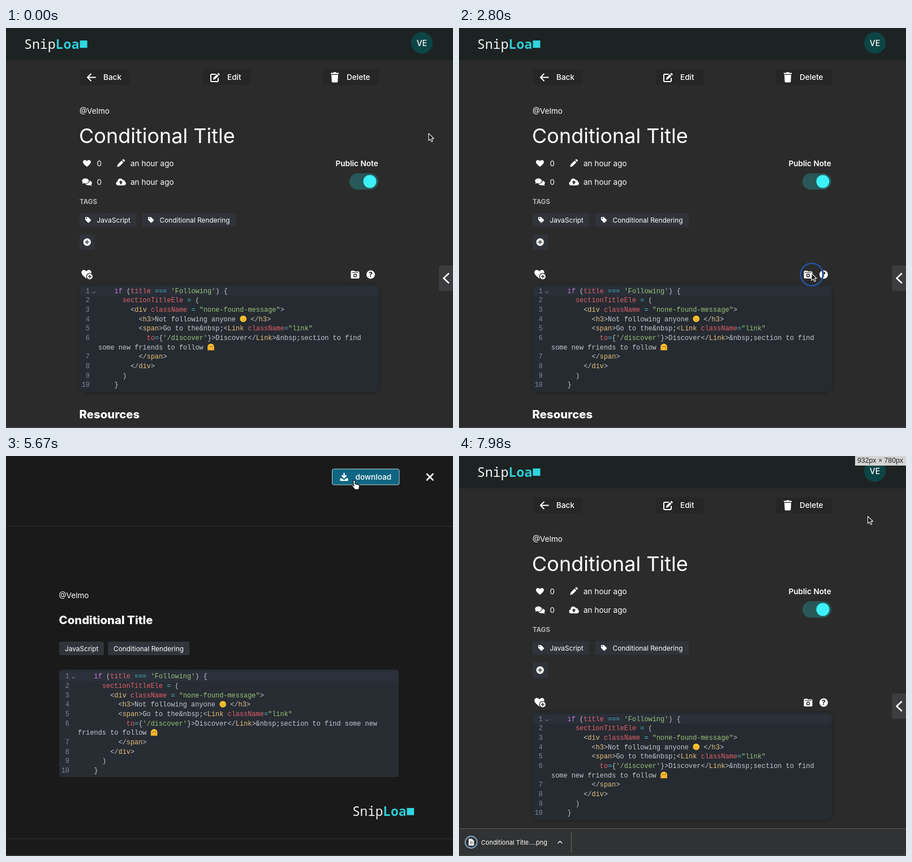
Recreate the animation shown at these times as an HTML page. Size 790 by 709 pixels, loop 8 s.

```html
<!DOCTYPE html>
<html lang="en">
<head>
<meta charset="utf-8">
<title>Code note</title>
<style>
  html, body { margin: 0; width: 100%; height: 100%; overflow: hidden; background: #2b2b2b; }
  svg { display: block; width: 790px; height: 709px; }
  text { white-space: pre; font-family: Inter, sans-serif; font-optical-sizing: none; }
  .code { font-family: "Liberation Mono", monospace; font-size: 11.92px; }
  .logo { font-family: "Noto Sans Mono", monospace; }
  .size { font-family: "Liberation Sans", sans-serif; }
  .line { fill: none; stroke: #fff; stroke-linecap: round; stroke-linejoin: round; }
</style>
</head>
<body>
<svg id="stage" viewBox="0 0 790 709"></svg>
<script>
const LOOP = 8000, CHAR = 7.15, ROW = 16.65;
const BODY = 13.57, SMALL = 11.87, HEADING = 20.35;
const USER = '@Velmo', TITLE = 'Conditional Title';
const COLORS = { w: '#c3c8d0', v: '#c678dd', r: '#e0606b', c: '#45bcc8', s: '#98c379', t: '#e5c07b', n: '#7d8799' };

const escape = s => s.replace(/&/g, '&amp;').replace(/</g, '&lt;');
const text = (x, y, s, size = BODY, weight = 400, fill = '#fff', extra = '') =>
  `<text x="${x}" y="${y}" font-size="${size}" font-weight="${weight}" fill="${fill}" ${extra}>${escape(s)}</text>`;
const rect = (x, y, w, h, fill, rx = 0, extra = '') =>
  `<rect x="${x}" y="${y}" width="${w}" height="${h}" rx="${rx}" fill="${fill}" ${extra}/>`;
const circle = (x, y, r, fill, extra = '') => `<circle cx="${x}" cy="${y}" r="${r}" fill="${fill}" ${extra}/>`;
const path = (d, fill = '#fff', extra = '') => `<path d="${d}" fill="${fill}" ${extra}/>`;
const line = (d, width = 2, extra = '') => `<path class="line" d="${d}" stroke-width="${width}" ${extra}/>`;
const at = (x, y, body, scale = 1) => `<g transform="translate(${x} ${y}) scale(${scale})">${body}</g>`;

// Each row: line number, indent, segments that start with a colour key; "e" is a face.
const rows = wide => [
  ['1', 4, "vif~w (~rtitle~c ===~s 'Following'~w) {"],
  ['2', 6, 'rsectionTitleEle~c =~w ('],
  ['3', 8, 'w<~tdiv~r className~c =~s "none-found-message"~w>'],
  ['4', 10, 'w<~th3~w>Not following anyone ~e~w </~th3~w>'],
  ['5', 10, 'w<~tspan~w>Go to the&nbsp;<~tLink~r className~c=~s"link"'],
  ['6', 12, "rto~c=~w{~s'/discover'~w}>Discover</~tLink~w>&nbsp;section to find" + (wide ? ' some new' : '')],
  ['', 0, (wide ? 'w' : 'wsome new ') + 'friends to follow ~ep'],
  ['7', 10, 'w</~tspan~w>'],
  ['8', 8, 'w</~tdiv~w>'],
  ['9', 6, 'w)'],
  ['10', 4, 'w}'],
];

const face = peeking => circle(6, 0, 5.8, '#fdc52f') + (peeking
  ? path('M3.5-2h2v2h-2zM7-2h2v2h-2z', '#8a5a1a') + path('M.2 0h3.300q1.500 3 1.500 5.800h-4.800zM11.800 0h-3.300q-1.500 3-1.500 5.800h4.800z', '#f5ae2b')
  : line('M2.700-.3q1 .8 2 .2M7.300-.1q1 .6 2-.2M4.800 2.800h2.400', .8, 'style="stroke:#a36a1c"'));

function codeBlock(left, top, wide) {
  return rows(wide).map(([number, indent, source], i) => {
    const y = top + i * ROW;
    let x = left + indent * CHAR;
    const mono = (px, s, color, extra = '') =>
      `<text class="code" x="${px}" y="${y + 3.8}" fill="${color}" ${extra}>${escape(s)}</text>`;
    let out = mono(left - 15, number, COLORS.n, 'text-anchor="end"');
    for (const part of source.split('~')) {
      const key = part[0], s = part.slice(1);
      if (key === 'e') {
        out += at(x, y - .5, face(s));
        x += 11.9;
      } else {
        out += mono(x, s, COLORS[key]);
        x += s.length * CHAR;
      }
    }
    return out;
  }).join('') + line(`M${left - 10} ${top + 1.5}l2.3 2.3 2.3-2.3`, 1, 'style="stroke:#99a0ab"');
}

const logo = (x, y, size) =>
  text(x, y, 'Snip', size, 300, '#f2f2f2', 'class="logo"') +
  text(x + size * 2.4, y, 'Loa', size, 700, '#2fcbd5', 'class="logo"') +
  rect(x + size * 4.25, y - size * .62, size * .56, size * .56, '#2fd6e0');

const heart = path('M0 6C-4 2.6-7 .3-7-2.6C-7-6.6-2-7.4 0-3.9C2-7.4 7-6.6 7-2.6C7 .3 4 2.6 0 6Z');
const pencil = path('M-7 7l1-4.4 7.4-7.4 3.4 3.4-7.4 7.4zM2.4-5.8l1.3-1.3q1-.7 1.9.1l1.5 1.5q.8.9 0 1.9l-1.3 1.3z');
const tagIcon = path('M-5-4.2q0-.8.8-.8h4.2l5 5q.6.7 0 1.4l-3.7 3.6q-.7.6-1.4 0l-4.9-4.9z') + circle(-2.7, -2.7, 1, '#30333a');
const plus = (r, ink) => circle(0, 0, r, '#fff') + line(`M${-r * .5} 0h${r}M0 ${-r * .5}v${r}`, 1.5, `style="stroke:${ink}"`);
const comments = path('M-2.7-6.5c8 0 8 9 0 9q-1.6 0-2.6-.4q-1.4 1-3.4 1q1.3-1.2 1.4-2.4c-3-3-.4-7.2 4.6-7.2z') +
  path('M4.6-2.5c4.4 1 5.4 4.4 3 6.6q.2 1.3 1.2 2.3q-2 0-3.4-1c-4 1-7-.3-8-2.2c4 0 7.4-2 7.2-5.7z');
const cloud = path('M-4.5 6q-4-.4-4-3.8q.2-2.8 2.8-3.4q.1-5 4.9-5q3 0 4.3 2.7q3.7-.4 3.6 2.9q2.1 1 1.9 3.2q-.3 3.2-3.5 3.4z') +
  path('M0-2.8l3.6 3.7h-2.4v3.2h-2.4v-3.2h-2.4z', '#2b2b2b');
const editIcon = line('M1-5.5h-6.3q-1.7 0-1.7 1.7v9.6q0 1.7 1.7 1.7h9.6q1.7 0 1.7-1.7v-4', 2) +
  at(2.6, -1.6, pencil, .82);
const trash = path('M-7-8h4l1-1.3h4l1 1.3h4v2.2h-14zM-6-4.6h12l-.7 12q-.2 1.6-1.8 1.6h-7q-1.6 0-1.8-1.6z');
const camera = path('M-7.5-5q0-1.7 1.5-1.7h4.5l1 1.2h6.5q1.5 0 1.5 1.5v9.3q0 1.7-1.7 1.7h-11.6q-1.7 0-1.7-1.7z') +
  line('M-5.500-3.400h11', 1, 'style="stroke:#2b2b2b"') + circle(0, 1.8, 3.2, '#2b2b2b') + circle(0, 1.8, 1.7, '#fff');
const downloadIcon = line('M0-6v6.5M-3.3-2l3.3 3.3 3.3-3.3', 2.4) + path('M-7 2.5h3l4 3 4-3h3v4.7h-14z');

const page = rect(0, 0, 790, 709, '#2b2b2b') +
  rect(0, 0, 790, 57, '#1d2323') + rect(0, 57, 790, 1, '#262828') +
  logo(32, 36.5, 23.2) +
  circle(735, 26.5, 19, '#0d4546') + text(735, 31.7, 'VE', 14, 500, '#fff', 'text-anchor="middle"') +
  rect(131, 73.5, 88, 27.5, '#262626', 3) + line('M144 87.5h14M150 81.5l-6 6 6 6') + text(172, 92, 'Back', BODY, 500) +
  rect(348, 73.5, 84, 27.5, '#262626', 3) + at(369, 87.5, editIcon) + text(391, 92, 'Edit', BODY, 500) +
  rect(560, 73.5, 99, 27.5, '#262626', 3) + at(581, 87.5, trash) + text(602, 92, 'Delete', BODY, 500) +
  text(130, 152, USER) + text(129, 204, TITLE, 36) +
  at(143, 240, heart) + text(160.5, 244.5, '0') + at(203, 239.5, pencil, .95) + text(220, 244.5, 'an hour ago') +
  at(143, 273, comments) + text(160.5, 278, '0') + at(203, 273, cloud) + text(220, 278, 'an hour ago') +
  text(582.5, 245, 'Public Note', BODY, 600) + rect(607, 257.5, 51, 29, '#285859', 14.5) + circle(643, 272, 11.5, '#3df1f9') +
  text(130, 311.5, 'TAGS', 11.5, 700, '#b0b0b0') +
  rect(130, 328, 100, 24.5, '#30333a', 3) + at(145, 340, tagIcon) + text(160.5, 344.5, 'JavaScript', SMALL) +
  rect(240.5, 328, 166, 24.5, '#30333a', 3) + at(256, 340, tagIcon) + text(271.5, 344.5, 'Conditional Rendering', SMALL) +
  rect(130, 366, 27, 27, '#30333a', 3) + at(143.3, 379.5, plus(6.7, '#30333a')) +
  at(142, 436.5, heart, 1.25) + circle(148, 440.5, 6.3, '#2b2b2b') + at(148, 440.5, plus(5, '#2b2b2b')) +
  circle(617, 437, 14, '#555', 'id="glow"') + at(617, 437, camera) +
  circle(644.5, 437, 7.5, '#fff') + text(644.5, 441.3, '?', 12, 800, '#2b2b2b', 'text-anchor="middle"') +
  rect(765, 421, 30, 45, '#3d3d3f', 4) + line('M782 435.5l-8.500 8 8.500 8', 2.7) +
  rect(128, 453, 534, 196, '#252525', 18, 'style="filter:blur(2px)"') +
  rect(130, 455, 529, 190, '#262b31', 10) + rect(131, 457.5, 527, 17, '#2a2f38') + codeBlock(163, 466, false) +
  text(129.5, 692, 'Resources', HEADING, 800) +
  `<g id="tip">${rect(410, 387, 221.5, 25, '#383838', 3)}${path('M609 412h17l-8.5 6z', '#383838')}${text(414.5, 404, 'Download an image of this SnipLoam', SMALL)}</g>` +
  circle(623.5, 437, 19.8, 'none', 'id="ring" stroke="#24509a" stroke-width="2.8"');

const dashes = y => line(`M2 ${y}h787`, 1, 'stroke-dasharray="3 2" style="stroke:#3b3b3b;stroke-linecap:butt"');
const modal = rect(0, 0, 790, 709, '#1a1a1a') + dashes(124.5) + dashes(678.5) +
  rect(576.5, 23, 118.5, 28, '#063d52', 3) +
  rect(576.5, 23, 118.5, 28, '#0f6682', 3, 'id="hover" stroke="#b4cdd5"') +
  at(597.5, 37, downloadIcon) + text(617.5, 42, 'download', BODY, 500) +
  line('M744 32l10.5 10.5M754.5 32l-10.5 10.5', 2.6) +
  text(93.5, 252, USER) + text(93.5, 298, TITLE, HEADING, 800) +
  rect(94, 329, 79, 24, '#31343a', 3) + text(104, 345.5, 'JavaScript', SMALL) +
  rect(180, 329, 144.5, 24, '#31343a', 3) + text(190, 345.5, 'Conditional Rendering', SMALL) +
  rect(94, 378.5, 600, 190.5, '#282c33', 4) + rect(94, 382, 600, 17, '#2b303a') + codeBlock(127, 390.5, true) +
  logo(612, 638, 22.7);

const badge = circle(0, 0, 30.5, '#e8eaed') +
  path('M-4-13h8v9h5.5l-9.5 9.5-9.5-9.5h5.5zM-13.5 17h27v3.5h-27z', '#3b78c9');

const shelf = rect(0, 0, 790, 49, '#313233') + rect(0, 0, 790, 1, '#5a5a5a') + rect(198, 6, 1, 37, '#666') +
  circle(21.5, 24.5, 10.5, 'none', 'stroke="#84a9cc" stroke-width="1.8"') +
  path('M17 18.5h6l3.5 3.5v8.5h-9.5z', '#f1f1f1') + line('M19.5 24h4.5M19.5 26.5h4.5', 1, 'style="stroke:#555"') +
  text(39, 28.7, 'Conditional Title....png', 11) + line('M175 26.3l3.5-3.5 3.5 3.5', 1.3);

const arrow = path('M0 0v12.5l3-2.7 2 4.6 2.2-1-2-4.5h4z', '#111', 'stroke="#f4f4f4" stroke-width="1.1" stroke-linejoin="round"');
const hand = path('M-1.2-1q0-1.5 1.5-1.5q1.5 0 1.5 1.5v4l5 1.2q1.8.6 1.6 2.4l-.7 3.6q-.3 1.3-1.2 1.3h-4.4q-1 0-1.5-.8l-3.3-4.2q-.5-1.2.4-1.5q1-.2 2.1.9z',
  '#fff', 'stroke="#111" stroke-width="1"');

const stage = document.getElementById('stage');
stage.innerHTML = page + `<g id="modal">${modal}</g><g id="badge">${badge}</g><g id="shelf">${shelf}</g>` +
  rect(0, 707.5, 790, 1, '#4b4b4b') +
  `<g id="size">${rect(700, 0, 90, 17, '#d4d4d4')}${text(704, 11.5, '', 12.3, 400, '#222', 'id="sizeText" class="size"')}</g>` +
  `<g id="cursor"><g id="arrow">${arrow}</g><g id="hand">${at(1, 0, hand, 1.15)}</g></g>`;

const el = Object.fromEntries([...stage.querySelectorAll('[id]')].map(node => [node.id, node]));
const ramp = (t, from, to) => Math.min(1, Math.max(0, (t - from) / (to - from)));
const smooth = u => u * u * (3 - 2 * u);
const show = (node, opacity) => node.setAttribute('opacity', +opacity);
const move = (node, x, y) => node.setAttribute('transform', `translate(${x} ${y})`);
const within = (t, a, b) => t >= a && t < b;

const stops = [[0, 747, 187], [400, 747, 187], [1250, 623, 435], [3400, 623, 435], [4100, 614, 46], [6650, 614, 46], [6900, 722.5, 107]];
function cursorAt(t) {
  const next = stops.findIndex(s => s[0] > t);
  if (next < 0) return stops.at(-1).slice(1);
  const [t0, x0, y0] = stops[next - 1], [t1, x1, y1] = stops[next];
  const u = smooth(ramp(t, t0, t1));
  return [x0 + (x1 - x0) * u, y0 + (y1 - y0) * u];
}

function draw(t) {
  move(el.cursor, ...cursorAt(t));
  const pointing = within(t, 1190, 2720) || within(t, 4050, 6720);
  show(el.hand, pointing);
  show(el.arrow, !pointing);

  show(el.glow, within(t, 1190, 2720));
  show(el.tip, t < 2720 ? ramp(t, 1400, 1580) : 0);
  show(el.ring, within(t, 2720, 3200));

  const open = ramp(t, 2810, 3110) - ramp(t, 6894, 7194);
  show(el.modal, open);
  move(el.modal, 0, (1 - open) * 104);
  el.modal.style.filter = open < 1 ? `blur(${(1 - open) * 9}px)` : 'none';
  show(el.hover, ramp(t, 4050, 4250) - ramp(t, 6750, 7050));

  const fall = ramp(t, 6900, 7500);
  show(el.badge, 1 - 4 * (fall - .5) ** 2);
  move(el.badge, 28.5, 615 + 60 * fall);

  const rise = smooth(ramp(t, 7250, 7420));
  move(el.shelf, 0, 709 - 49 * rise);
  show(el.size, t >= 7250);
  el.sizeText.textContent = `932px × ${Math.round(838 - 58 * rise)}px`;
}

function tick() {
  draw(performance.now() % LOOP);
  requestAnimationFrame(tick);
}
tick();
</script>
</body>
</html>
```
